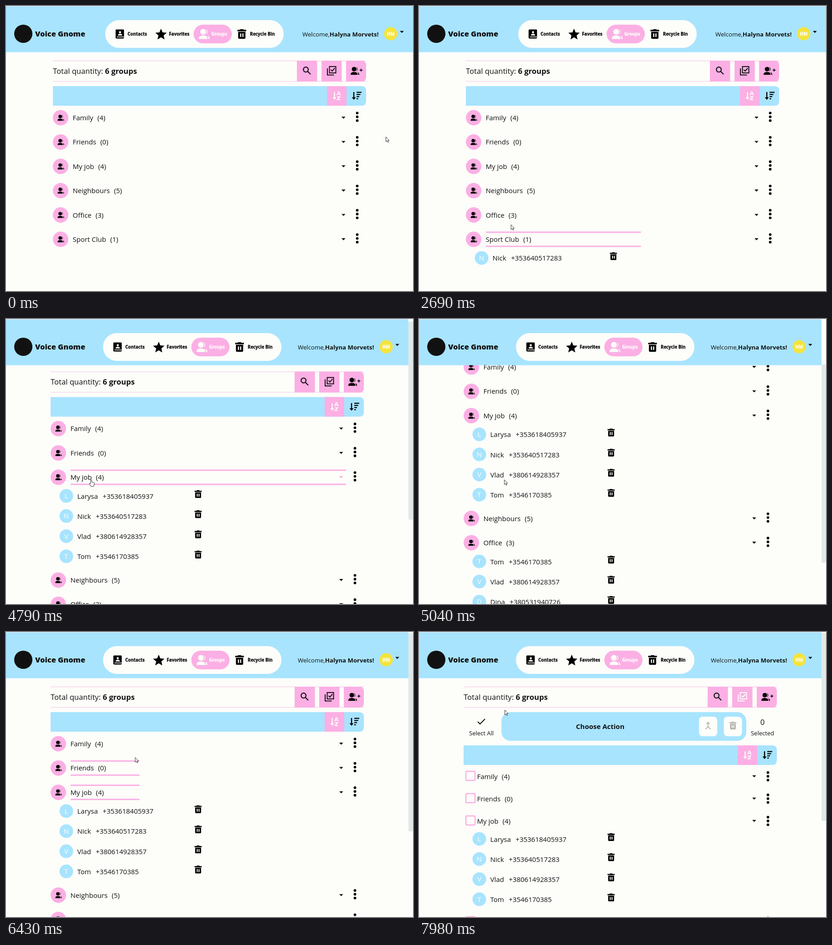
Animation of 894 by 626 pixels, one loop 8000 ms. Source, as an HTML page:

```html
<!DOCTYPE html>
<html lang="en">
<head>
<meta charset="utf-8">
<title>Contact groups</title>
<style>
  html, body { margin: 0; width: 894px; height: 626px; overflow: hidden; background: #fdfdfa; }
  svg { display: block; }
  text { font: 15px "Open Sans", "Noto Sans", sans-serif; fill: #111; white-space: pre; }
  .bold { font-weight: 700; }
  .mid { text-anchor: middle; }
  .white { fill: #fdfdfa; }
  .pink { fill: #fbafe4; }
  .blue { fill: #a8e4fe; }
  .rule { fill: #f3c3e4; }
  .brand { font-size: 16.4px; font-weight: 800; }
  .nav { font-size: 9.7px; font-weight: 700; stroke: currentColor; stroke-width: .3; }
  .nav.white { color: #fdfdfa; }
  .user { font-size: 13.2px; }
  .total { font-size: 16.6px; }
  .small { font-size: 13px; font-weight: 500; }
</style>
</head>
<body>
<svg id="stage" width="894" height="626">
  <defs>
    <symbol id="trash" viewBox="0 0 16 18"><path fill-rule="evenodd" d="M0 1.3h4.5L5.5 0h5l1 1.3H16V4H0zM1.3 5h13.4v11q0 2-2 2H3.3q-2 0-2-2zM5 8v6.5h2V8zM9 8v6.5h2V8z"/></symbol>
    <symbol id="people" viewBox="0 0 15 14"><circle cx="6" cy="4" r="4"/><path d="M0 14v-1.5Q.5 9 6 9t6 3.5V14zM9.5 .3a4 4 0 0 1 0 7.4Q11.2 6 11.2 4T9.5 .3M12 9.4q3 1 3 4.6h-1.7q0-3-1.3-4.6"/></symbol>
    <symbol id="book" viewBox="0 0 20 21"><rect width="20" height="21" rx="2.5"/><g class="white"><circle cx="10.5" cy="6.5" r="2.5"/><path d="M5.5 14q0-4 5-4t5 4zM3 16.5h17V18H3z"/></g></symbol>
    <symbol id="star" viewBox="2 2 20 19"><path d="M12 17.3 18.2 21l-1.6-7L22 9.2l-7.2-.6L12 2 9.2 8.6 2 9.2 7.5 14 5.8 21z"/></symbol>
    <symbol id="search" viewBox="0 0 18 18"><g fill="none" stroke="#111" stroke-width="2.2"><circle cx="6.6" cy="6.6" r="5.4"/><path d="m10.5 10.5 6.5 6.5"/></g></symbol>
    <symbol id="down" viewBox="0 0 9 17"><path d="M3.3 0h2.4v11.5H9L4.5 17 0 11.5h3.3z"/></symbol>
    <symbol id="caret" viewBox="0 0 9 5"><path d="M0 0h9L4.5 4.8z"/></symbol>
  </defs>
  <rect width="894" height="626" fill="#fdfdfa"/>
  <g id="main"></g>
  <g id="header"></g>
  <g id="scrollbar">
    <rect x="884" width="10" height="626" fill="#fdfdfc"/>
    <rect id="thumb" x="884" width="10" rx="4" fill="#e1e8e7"/>
  </g>
  <path id="arrow" d="M.5 .5V11L3 8.8l1.7 3.7 1.7-.8-1.7-3.5h3z" fill="#fff" stroke="#222" stroke-width=".9"/>
  <path id="hand" d="M-1.2 9.5V1.2Q0-.6 1.2 1.2v4.3l4.6 1q1.3.4 1.2 2l-.8 4.2-1 2.6H-.3L-3.8 9.8Q-4 8-2.4 8.4z" fill="#fff" stroke="#222" stroke-width=".9"/>
</svg>
<script>
const DURATION = 8000, SELECT_AT = 7250, OPEN_MS = 140, KID = 44.2;
const $ = id => document.getElementById(id);
const clamp = v => Math.max(0, Math.min(1, v));
const ease = v => { v = clamp(v); return v * v * (3 - 2 * v); };
const show = (el, on) => el.setAttribute('display', on ? 'inline' : 'none');
const move = (el, x, y) => el.setAttribute('transform', `translate(${x} ${y})`);

const nick = ['Nick', '+353640517283'], vlad = ['Vlad', '+380614928357'], tom = ['Tom', '+3546170385'];
const groups = [
  { name: 'Family', count: 4 },
  { name: 'Friends', count: 0 },
  { name: 'My job', count: 4, openAt: 4380, kids: [['Larysa', '+353618405937'], nick, vlad, tom] },
  { name: 'Neighbours', count: 5 },
  { name: 'Office', count: 3, openAt: 3050, kids: [tom, vlad, ['Dina', '+380531940726']] },
  { name: 'Sport Club', count: 1, openAt: 2060, kids: [nick] },
];

// Pointer path: time, x, y
const path = [
  [0, 834, 287], [920, 834, 287], [1480, 300, 545], [1670, 240, 527], [1830, 223, 517],
  [2480, 223, 517], [2840, 189, 458], [3700, 189, 458], [4200, 187, 352.5], [5000, 187, 352.5],
  [5200, 186, 353], [6250, 186, 353], [6660, 422, 164], [6720, 422, 164], [7080, 711, 142],
  [7450, 711, 142], [7690, 655, 142], [7980, 188, 171], [8000, 188, 171],
];

const icon = (id, cx, cy, w, h, cls = '') =>
  `<use href="#${id}" x="${cx - w / 2}" y="${cy - h / 2}" width="${w}" height="${h}" class="${cls}"/>`;
const text = (s, x, y, cls = '') => `<text x="${x}" y="${y}" class="${cls}">${s}</text>`;
const rect = (x, y, w, h, cls, rx = 0) =>
  `<rect x="${x}" y="${y}" width="${w}" height="${h}" rx="${rx}" class="${cls}"/>`;
// Box with only its right corners rounded
const tab = (x, y, w, h, cls) =>
  `<path class="${cls}" d="M${x} ${y}h${w - 10}q10 0 10 10v${h - 20}q0 10-10 10h${10 - w}z"/>`;

const kidMarkup = ([name, phone], j) => {
  const y = 23 + KID * j;
  return `<circle cx="34.5" cy="${y}" r="15" class="blue"/>${text(name[0], 34.5, y + 5.5, 'mid white')}
    <text x="58.5" y="${y + 6}">${name}<tspan dx="10.5">${phone}</tspan></text>
    ${icon('trash', 324, y - 4, 16, 17.5)}`;
};

const rowMarkup = ({ name, count, kids = [] }) => `<g class="row">
  <g class="badge"><circle cx="17" r="17" class="pink"/>${icon('people', 17.5, 0, 14.5, 13.5)}</g>
  <rect class="box" x="5" y="-11" width="20" height="20" rx="2" fill="none" stroke="#fbafe4" stroke-width="2.5"/>
  <text class="label" y="5.5">${name}<tspan dx="9">(${count})</tspan></text>
  <g class="lines pink"><rect x="44" y="-17" height="3"/><rect x="44" y="14" height="3"/></g>
  ${icon('caret', 638.3, 0, 9, 5, 'caret')}
  <g class="dots">${[-8.3, 0, 8.3].map(y => `<circle cx="668.5" cy="${y}" r="2.9"/>`).join('')}</g>
  <svg class="kids" width="688">${kids.map(kidMarkup).join('')}</svg></g>`;

$('main').innerHTML = `
  ${rect(0, 120, 688, 1, 'rule')}${rect(0, 165, 688, 1, 'rule')}
  <text x="0" y="149" class="total">Total quantity: <tspan class="bold">6 groups</tspan></text>
  ${rect(536, 120, 44.5, 46, 'pink')}${rect(590, 120, 44.5, 46, 'pink')}${tab(644, 120, 44, 46, 'pink')}
  ${icon('search', 558, 142, 18, 18)}
  <path id="selectIcon" d="M607.5 133h14v14h-14zM603 137v14.5h14.5M610.5 140l3 3 5.5-6.5" fill="none" stroke-width="2"/>
  ${icon('people', 663.5, 142.5, 19, 18)}
  <path d="M677 137.5v6.5M673.8 140.8h6.5" stroke="#111" stroke-width="1.7"/>
  <g id="panel">
    <path d="m31 197 5 5 11-11" fill="none" stroke="#111" stroke-width="2"/>
    ${text('Select All', 39, 227, 'mid small')}
    ${rect(83, 176, 538, 63, 'blue', 20)}${text('Choose Action', 300, 213, 'mid bold')}
    ${rect(517, 186, 40, 43, 'white', 8)}${rect(571.5, 186, 40, 43, 'white', 8)}
    <g fill="#b4b5ae">${icon('trash', 591.5, 205.5, 16, 17)}</g>
    <path d="M531.5 213.5 537 208v-9M537 208l5.5 5.5M533.5 202l3.5-3.5 3.5 3.5" fill="none" stroke="#b4b5ae" stroke-width="1.8"/>
    ${text('0', 656.5, 204, 'mid total')}${text('Selected', 656.5, 227, 'mid small')}
  </g>
  <g id="sortBar">
    ${tab(0, 176, 688, 43, 'blue')}${rect(602, 176, 43, 43, 'pink')}
    ${icon('down', 618.5, 197.5, 9, 17, 'white')}
    <path d="m624 196 3-7.5h1.6l3 7.5M625.3 193.7h5M624.5 199.5h6l-6 6h6.5" fill="none" stroke="#fdfdfa" stroke-width="1.8"/>
    ${icon('down', 661, 197.5, 9, 17)}
    ${[11, 8.5, 6, 3.5].map((w, i) => rect(667, 188.5 + i * 4.7, w, 2.3, '')).join('')}
  </g>
  ${groups.map(rowMarkup).join('')}`;

$('header').innerHTML = `
  <rect width="894" height="1" fill="#eef0ee"/>
  <rect id="band" y="1" height="100.5" class="blue"/>
  <circle cx="38" cy="61" r="20" fill="#111"/>
  ${text('Voice Gnome', 64, 67, 'brand')}
  <g id="nav">
    ${rect(0, 31, 392, 61, 'white', 30.5)}${rect(194, 41, 84, 41, 'pink', 20.5)}
    ${icon('book', 32, 61.5, 19, 21)}${text('Contacts', 49, 65, 'nav')}
    ${icon('star', 122.5, 61.5, 25, 24)}${text('Favorites', 140, 65, 'nav')}
    ${icon('people', 217.5, 61.5, 24, 22.5, 'white')}${text('Groups', 233, 65, 'nav white')}
    ${icon('trash', 300, 61.5, 20, 21.5)}${text('Recycle Bin', 318, 65, 'nav')}
  </g>
  <g id="user">
    <text x="-243" y="67" class="user">Welcome,<tspan class="bold">Halyna Morvets!</tspan></text>
    <circle cx="-49" cy="61" r="14.5" fill="#f5e43c"/>
    ${text('HM', -49, 64.8, 'mid nav white')}
    ${icon('caret', -24.5, 57, 9, 5)}
  </g>`;

const rowEls = [...document.querySelectorAll('.row')].map(el => {
  const part = name => el.querySelector('.' + name);
  return { el, badge: part('badge'), box: part('box'), label: part('label'), caret: part('caret'),
    dots: part('dots'), kids: part('kids'), lines: [...part('lines').children] };
});

function pointer(t) {
  const i = path.findIndex(key => key[0] > t);
  const [t0, x0, y0] = path[i - 1], [t1, x1, y1] = path[i];
  const k = ease((t - t0) / (t1 - t0));
  return { x: x0 + (x1 - x0) * k, y: y0 + (y1 - y0) * k };
}

function layout(t) {
  const select = t >= SELECT_AT, pitch = select ? 49 : 53.4;
  let y = select ? 317 : 245.4;
  const rows = groups.map(({ openAt, kids }) => {
    const row = { y, kids: kids ? clamp((t - openAt) / OPEN_MS) * (KID * kids.length - 4.4) : 0 };
    y += pitch + row.kids;
    return row;
  });
  const total = y - pitch + 46, width = total > 626 ? 884 : 894;
  const scroll = 196 * (ease((t - 4750) / 450) - ease((t - 6045) / 365));
  return { select, rows, total, width, scroll, left: width / 2 - 344 };
}

function hoveredRow(t) {
  const { rows, left, scroll } = layout(t), p = pointer(t), x = p.x - left;
  if (x < 44 || x > 649 || p.y < 102) return -1;
  return rows.findIndex(row => Math.abs(row.y - scroll - p.y) < 16);
}

function draw(t) {
  const { select, rows, total, width, scroll, left } = layout(t);
  // Hover lines grow with the share of the last 160 ms spent over the row
  const recent = Array.from({ length: 16 }, (_, i) => hoveredRow(Math.max(0, t - i * 10)));

  move($('main'), left, -scroll);
  move($('nav'), width / 2 - 229, 0);
  move($('user'), width, 0);
  $('band').setAttribute('width', width);
  show($('panel'), select);
  move($('sortBar'), 0, select ? 73 : 0);
  $('selectIcon').setAttribute('stroke', select ? '#fdfdfa' : '#111');

  rows.forEach((row, i) => {
    const r = rowEls[i], grow = recent.filter(h => h === i).length / recent.length;
    move(r.el, 0, row.y);
    show(r.badge, !select);
    show(r.box, select);
    r.label.setAttribute('x', select ? 29.5 : 43.5);
    r.lines.forEach(line => line.setAttribute('width', 605 * grow));
    r.caret.setAttribute('fill', recent[0] === i ? '#fbafe4' : '#111');
    move(r.dots, 0, select ? 0 : -2);
    r.kids.setAttribute('y', select ? 16.5 : 18);
    r.kids.setAttribute('height', row.kids);
  });

  show($('scrollbar'), total > 626);
  $('thumb').setAttribute('y', 2 + scroll * 626 / total);
  $('thumb').setAttribute('height', 626 * 626 / total);

  const p = pointer(t), onButton = Math.abs(p.x - left - 612) < 22 && Math.abs(p.y - 143) < 23;
  const hand = recent[0] >= 0 || onButton;
  show($('hand'), hand);
  show($('arrow'), !hand);
  move($(hand ? 'hand' : 'arrow'), p.x, p.y);
}

function tick() {
  draw(performance.now() % DURATION);
  requestAnimationFrame(tick);
}
tick();
</script>
</body>
</html>
```
